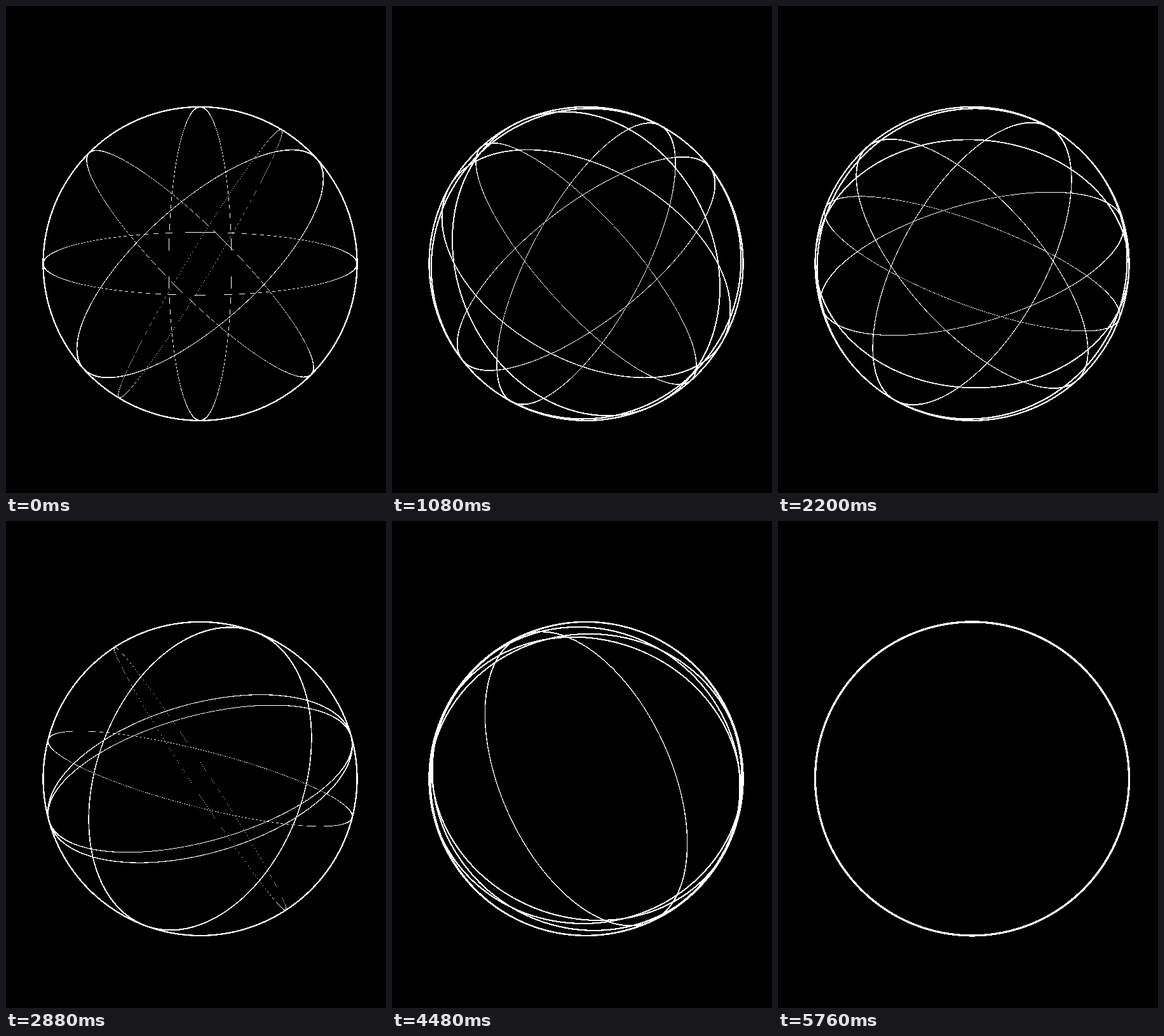
Animation, 598 px wide and 767 px high, one loop 8000 ms. Source, as an HTML page with a canvas:

```html
<!DOCTYPE html>
<html lang="en">
<head>
<meta charset="utf-8">
<title>Turning rings</title>
<style>
  html, body { margin: 0; width: 100%; height: 100%; overflow: hidden; background: #000; }
  canvas { display: block; }
</style>
</head>
<body>
<canvas id="stage" width="598" height="767"></canvas>
<script>
const LOOP = 8000, STEP = 40;
const CX = 305, CY = 405.4, R = 247, STROKE = 2.3;
const X0 = 50, Y0 = 150, SIZE = 511;

const ctx = document.getElementById('stage').getContext('2d');
const img = ctx.createImageData(SIZE, SIZE);
const px = new Uint32Array(img.data.buffer);
const BLACK = 0xff000000, WHITE = 0xffffffff;

// Each pose is [angle of the long axis in degrees, short axis / long axis].
const TIMES = [0, 560, 1560, 2880, 3760, 4480, 5760];
const FLAT = [0, 1];
const RINGS = [
  [[0, .2], [19.8, .372], [39.7, .708], [56.9, .06], [107, .407], [65.5, .542], FLAT],
  [[-90, .2], [-111.7, .228], [-147.7, .314], [-165.6, .18], [-156.9, .065], [-158.4, .887], FLAT],
  [[-58.8, .08], [-53.5, .312], [-24.9, .376], [-15.5, .4], [-52.2, .502], [-7, .922], FLAT],
  [[-42, .379], [-66.4, .462], [-56.2, .3], [-69.7, .66], [-83.6, .819], [-80, .992], FLAT],
  [[45, .21], [60.3, .604], [55, .91], [-16.2, .476], [-15.4, .844], [38, .947], FLAT],
  [FLAT, FLAT, [-48.5, .937], FLAT, FLAT, FLAT, FLAT]
].map(poses => poses.map(toNormal));

function toNormal([deg, c]) {
  const a = deg * Math.PI / 180, s = Math.sqrt(1 - c * c);
  return [-Math.sin(a) * s, Math.cos(a) * s, c];
}

function slope(keys, i, axis) {
  if (i === 0 || i === keys.length - 1) return 0;
  return (keys[i + 1][axis] - keys[i - 1][axis]) / (TIMES[i + 1] - TIMES[i - 1]);
}

// Smooth path of a ring's unit normal through its poses.
function normalAt(keys, t) {
  const last = TIMES.length - 1;
  if (t >= TIMES[last]) return keys[last];
  let i = 0;
  while (t >= TIMES[i + 1]) i++;
  const span = TIMES[i + 1] - TIMES[i], u = (t - TIMES[i]) / span, w = 1 - u;
  const n = [0, 1, 2].map(k =>
    keys[i][k] * (1 + 2 * u) * w * w + keys[i + 1][k] * u * u * (3 - 2 * u) +
    span * u * w * (w * slope(keys, i, k) - u * slope(keys, i + 1, k)));
  const len = Math.hypot(...n);
  return n.map(v => v / len);
}

// A flat stroke seen at an angle: it thins out where it is foreshortened.
function drawRing([nx, ny, nz], width) {
  const s = Math.hypot(nx, ny) || 1;
  const dx = nx / s, dy = ny / s;
  const k = 1 / Math.max(nz * nz, 1e-6) - 1;
  const lo = (R - width / 2) ** 2, hi = (R + width / 2) ** 2;
  for (let j = 0, p = 0; j < SIZE; j++) {
    const y = j + Y0 - CY;
    for (let i = 0; i < SIZE; i++, p++) {
      const x = i + X0 - CX, v = x * dx + y * dy;
      const d = x * x + y * y + v * v * k;
      if (d > lo && d < hi) px[p] = WHITE;
    }
  }
}

function draw(t) {
  px.fill(BLACK);
  const grow = Math.min(1, Math.max(0, (t - 4200) / 1560));
  drawRing([0, 0, 1], STROKE + grow);
  if (t < TIMES[TIMES.length - 1]) {
    for (const keys of RINGS) drawRing(normalAt(keys, t), STROKE);
  }
  ctx.putImageData(img, X0, Y0);
}

ctx.fillStyle = '#000';
ctx.fillRect(0, 0, 598, 767);

const start = performance.now();
let shown = -1;
function tick() {
  const t = Math.floor((performance.now() - start) % LOOP / STEP) * STEP;
  if (t !== shown) draw(shown = t);
  requestAnimationFrame(tick);
}
tick();
</script>
</body>
</html>
```
